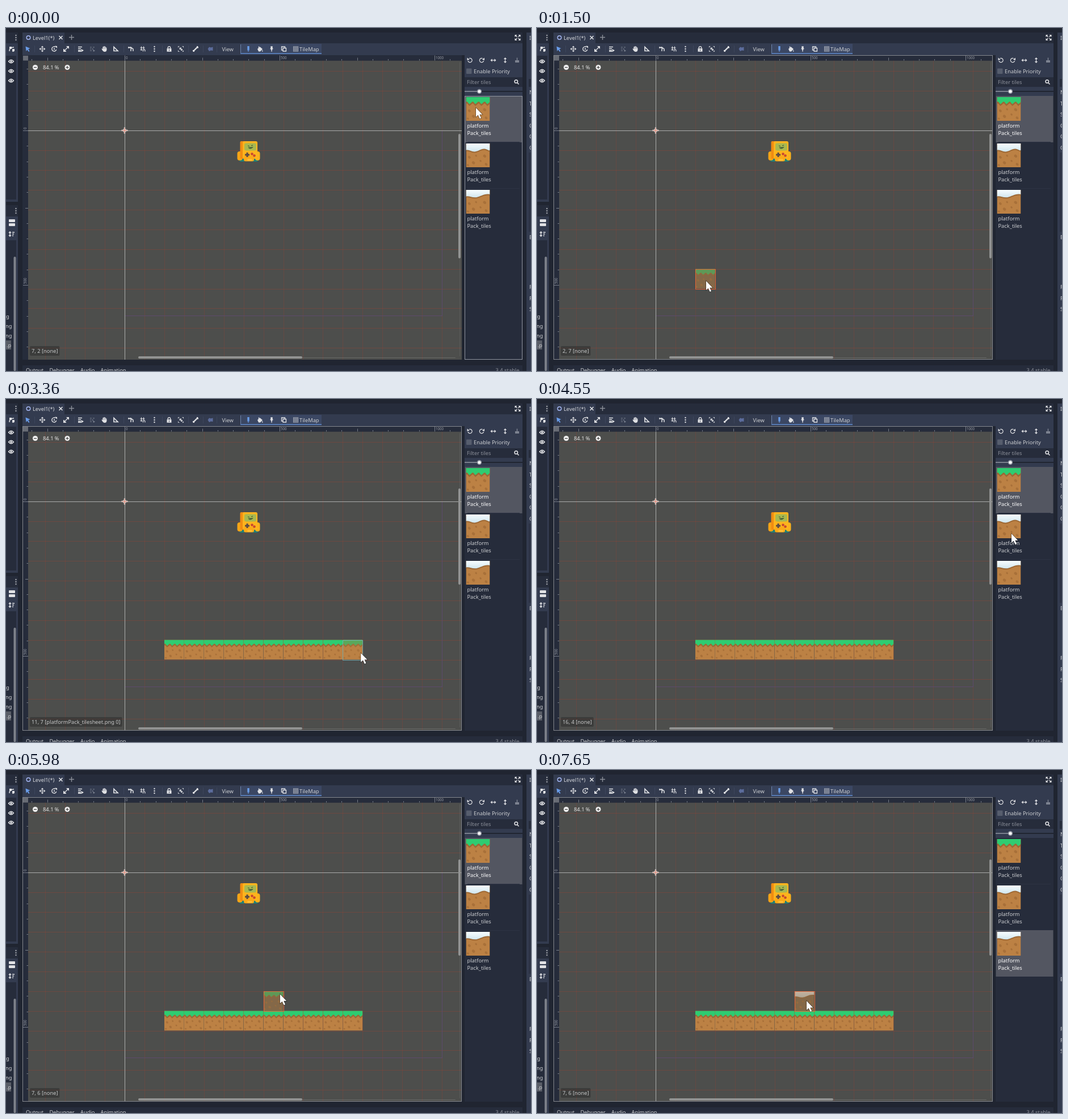
Recreate the animation shown at these times as an HTML page with a canvas. Size 925 px wide and 606 px high, loop 8 s.

```html
<!DOCTYPE html>
<html lang="en">
<head>
<meta charset="utf-8">
<title>Tile map editor</title>
<style>
html, body { margin: 0; width: 100%; height: 100%; overflow: hidden; background: #202531; }
canvas { display: block; }
</style>
</head>
<body>
<canvas id="stage" width="925" height="606"></canvas>
<script>
const g = document.getElementById('stage').getContext('2d');
const LOOP = 8000, ZOOM = 0.546, CELL = 64 * ZOOM, OX = 209, OY = 181;
const BASE = '#333b4f', DARK = '#262c3b', DARKER = '#202531', ICON = '#e0e1e4', BLUE = '#699ce8';
const PAINT = 1830, RELEASE = 3030, PICK_GRASS = 4970, PICK_SNOW = 6850;

// Cursor moves: start, end, steps, x, y, easing, optional control point
const smooth = u => u * u * (3 - 2 * u), easeIn = u => u * u, easeOut = u => u * (2 - u);
const MOVES = [
  [70, 840, 12, 297, 385, smooth],
  [900, 1500, 10, 298, 447, smooth],
  [PAINT, 2360, 9, 478, 449, easeIn],
  [2430, RELEASE, 10, 607, 452, easeOut],
  [3360, 3700, 6, 854, 258, smooth, 730, 437],
  [3960, 4160, 4, 836, 238, smooth],
  [4620, 4900, 5, 830, 150, smooth],
  [5240, 5780, 9, 476, 398, smooth],
  [5980, 6780, 12, 827, 313, smooth],
  [6980, 7650, 10, 475, 408, smooth]
];

function cursorAt(t) {
  let x = 828, y = 141;
  for (const [start, end, steps, ex, ey, ease, cx = (x + ex) / 2, cy = (y + ey) / 2] of MOVES) {
    if (t < start) break;
    const i = Math.floor((t - start) / (end - start) * (steps - 1) + 0.1);
    const u = ease(Math.min(i + 1, steps) / steps), v = 1 - u;
    x = v * v * x + 2 * u * v * cx + u * u * ex;
    y = v * v * y + 2 * u * v * cy + u * u * ey;
  }
  return { x, y };
}
const inView = p => p.x > 39 && p.x < 802 && p.y > 57 && p.y < 586;
const cellAt = p => [Math.floor((p.x - OX) / CELL), Math.floor((p.y - OY) / CELL)];

function lastInView(t) {
  for (let s = t; s >= 0; s -= 10) {
    const p = cursorAt(s);
    if (inView(p)) return { time: s, cell: cellAt(p) };
  }
  return { time: -2, cell: [7, 2] };
}

// Drawing helpers
function rect(x, y, w, h, c) { g.fillStyle = c; g.fillRect(x, y, w, h); }
function frame(x, y, w, h, c) { g.strokeStyle = c; g.lineWidth = 1; g.strokeRect(x + 0.5, y + 0.5, w - 1, h - 1); }
function pill(x, y, w, h, c, r = Math.min(w, h) / 2) {
  g.fillStyle = c; g.beginPath(); g.roundRect(x, y, w, h, r); g.fill();
}
function dot(x, y, r, c) { g.fillStyle = c; g.beginPath(); g.arc(x, y, r, 0, 7); g.fill(); }
function text(s, x, y, c = '#cdcfd2', size = 9.3) {
  g.font = size + 'px "Noto Sans", sans-serif'; g.fillStyle = c; g.fillText(s, x, y);
}
function icon(x, y, stroke, fill, c = ICON, w = 1.4) {
  g.save(); g.translate(x, y);
  g.strokeStyle = g.fillStyle = c; g.lineWidth = w;
  if (fill) g.fill(new Path2D(fill));
  if (stroke) g.stroke(new Path2D(stroke));
  g.restore();
}

// Tiles are described on a 64 unit square
const grassEdge = d => {
  let s = `M0 0V${13 + d}`;
  for (let x = 0; x < 64; x += 16) s += `L${x + 3} ${12 + d}L${x + 9} ${19 + d}L${x + 13} ${16 + d}L${x + 16} ${13 + d}`;
  return s + 'V0Z';
};
const snowEdges = [
  d => `M0 0V${18 + d}C10 ${16 + d} 14 ${23 + d} 24 ${22 + d}S42 ${12 + d} 52 ${15 + d}S60 ${20 + d} 64 ${18 + d}V0Z`,
  d => `M0 0V${18 + d}C8 ${15 + d} 16 ${22 + d} 28 ${20 + d}S48 ${9 + d} 64 ${12 + d}V0Z`
];
const SPOTS = [[9, 37, 4], [27, 33, 3], [50, 34, 4.5], [20, 52, 4.5], [39, 47, 3], [54, 56, 4], [5, 58, 3]];
function tile(kind, x, y, size, alpha = 1) {
  g.save();
  g.globalAlpha = alpha;
  g.translate(x, y); g.scale(size / 64, size / 64);
  g.beginPath(); g.rect(0, 0, 64, 64); g.clip();
  rect(0, 0, 64, 64, '#bc8144');
  for (const [sx, sy, r] of SPOTS) {
    g.fillStyle = '#a87039';
    g.beginPath(); g.ellipse(sx, sy, r, r * 0.8, 0.7, 0, 7); g.fill();
  }
  const edge = kind ? snowEdges[kind - 1] : grassEdge;
  g.fillStyle = '#9c6734'; g.fill(new Path2D(edge(kind ? 3 : 5)));
  let top = '#2ecc71';
  if (kind) {
    top = g.createLinearGradient(0, 0, 0, 22);
    top.addColorStop(0, '#f8fdff'); top.addColorStop(1, '#cfe5ed');
  }
  g.fillStyle = top; g.fill(new Path2D(edge(0)));
  g.restore();
}

function drawDocks() {
  rect(0, 0, 925, 606, DARKER);
  rect(0, 8, 21, 19, DARK);
  rect(0, 27, 21, 280, BASE);
  rect(0, 49, 18, 254, DARK);
  rect(0, 313, 21, 20, DARK);
  rect(0, 333, 21, 273, BASE);
  rect(0, 375, 18, 231, DARK);
  for (const y of [17, 323]) for (const d of [-4, 0, 4]) dot(17.5, y + d, 1.2, '#a5a8af');
  icon(10, 37, 'M-4 4C-4 -1 -1 -3 4 -3M-4 -3H0M1 1H4M1 4H4', 'M-4 -4H0V0H-4ZM1 0H5V4H1Z');
  for (const y of [59, 76, 93]) {
    icon(9, y, 'M-4.5 0Q0 -5.5 4.5 0Q0 5.5 -4.5 0Z');
    dot(9, y, 1.8, ICON);
  }
  pill(5, 338, 11, 5, ICON, 1); pill(5, 345, 11, 5, ICON, 1);
  icon(10, 364, 'M-3 -4V4M-5 -2L-3 -4L-1 -2M-5 2L-3 4L-1 2M1 -3H5M1 0H4M1 3H3');
  rect(0, 552, 9, 16, '#595d67');
  ['g', 'ng', 'ng', '.p'].forEach((s, i) => text(s, i ? -1 + (i === 3) * 2 : 0, 513 + i * 17));
  pill(13.5, 404, 4, 202, '#7e828b');

  rect(917, 8, 8, 19, BASE);
  rect(917, 27, 8, 579, BASE);
  rect(921, 90, 4, 14, DARK);
  rect(921, 220, 4, 140, '#2c3345');
  text('I', 922, 21);
  'NTSCCO'.split('').forEach((s, i) => text(s, 922, 117 + i * 19.5));
  [['E', 373], ['F', 461], ['F', 481], ['S', 500]].forEach(([s, y]) => text(s, 922, y));

  rect(29, 596, 881, 10, DARK);
  [['Output', 35], ['Debugger', 76.5], ['Audio', 131], ['Animation', 166.5]].forEach(([s, x]) => text(s, x, 607.5));
  text('3.4.stable', 862.5, 607.5, '#8b8f99');
}

function drawToolbar() {
  rect(29, 8, 881, 19, DARK);
  rect(29, 8, 74, 19, BASE);
  rect(29, 27, 881, 21, BASE);
  icon(39.5, 17, 'M3.3 0A3.3 3.3 0 1 1 -3.3 0A3.3 3.3 0 1 1 3.3 0', '', '#a5b7f3');
  text('Level1(*)', 47, 20.5, '#d8dade');
  icon(96.5, 17, 'M-3 -3L3 3M3 -3L-3 3', '', ICON, 1.6);
  icon(115.5, 16.5, 'M-4.5 0H4.5M0 -4.5V4.5', '', '#8b8f99');
  icon(901.5, 17, 'M-4 -4L-1 -1M4 -4L1 -1M-4 4L-1 1M4 4L1 1', 'M-5 -5H-1L-5 -1ZM5 -5H1L5 -1ZM-5 5H-1L-5 1ZM5 5H1L5 1Z', ICON, 1.2);

  for (const x of [50, 120, 207, 275, 321, 347, 371]) rect(x, 31, 1, 12, '#3d465b');
  rect(413, 28, 143, 18, '#3b4763');
  rect(413, 44.5, 143, 1.2, BLUE);
  rect(413, 29, 1, 15, '#6f86ae');
  const cross = 'M-4 0H4M0 -4V4';
  icon(38, 37, '', 'M-3.5 -4.5L4.5 -1L1.3 0.3L3.5 4L2 5L-0.5 1.5L-2.5 4Z', BLUE);
  icon(64, 37, cross, 'M0 -5.5L2.3 -2.8H-2.3ZM0 5.5L2.3 2.8H-2.3ZM-5.5 0L-2.8 -2.3V2.3ZM5.5 0L2.8 -2.3V2.3Z', ICON, 1);
  icon(85, 37, 'M3.7 1A4 4 0 1 1 2 -3.4', 'M1 -5.5L5 -5V-1ZM0 -1.2A1.2 1.2 0 1 1 0 1.2A1.2 1.2 0 1 1 0 -1.2');
  icon(106, 37, 'M-3 3L3 -3M-4 0V4H0', 'M0 -5H5V0ZM-5 0V5H0Z');
  icon(131, 37, 'M-4 -3.5H3M-4 -0.5H1M-4 2.5H1M-4 4.3H2', 'M1 0L6 2.5L2.5 5Z');
  icon(152, 37, 'M-4 -3H-1M1 -3H4M-4 0H-2M-1 0H2M-4 3H-1', 'M1 1L5 3L2 5Z', '#7c8290', 1.1);
  icon(173, 37, 'M-1.8 1V-4M0 1V-5M1.8 1V-4.3M3.6 2V-2.5M-2 3L-4 -0.5', 'M-3 0H4.3V2C4.3 6 -1 6 -3 2.5Z', ICON, 1.5);
  icon(193, 37, 'M-3 -3.5V3.5H4Z', '', ICON, 1.7);
  icon(220, 37, 'M-4 -4V-1M-1 -4V-1M-4 -2.5H2M0 4V1A2 2 0 0 1 4 1V4', '', ICON, 1.5);
  icon(240.5, 37, 'M-4 -2H4M-2 -4.5V3M2 -4.5V0M-4 1.5H0M1 4.5V2.5A1.7 1.7 0 0 1 4.4 2.5V4.5', '', ICON, 1.2);
  for (const d of [-4, 0, 4]) dot(261.5, 37 + d, 1.2, ICON);
  icon(287.5, 37, 'M-2.2 -0.5V-2.2A2.2 2.2 0 0 1 2.2 -2.2V-0.5', 'M-4 -0.8H4V4.8H-4Z');
  rect(287, 38, 1, 2.3, BASE);
  icon(308, 37, 'M-4.5 -2.5V-4.5H-2.5M2.5 -4.5H4.5V-2.5M4.5 2.5V4.5H2.5M-2.5 4.5H-4.5V2.5', 'M-2.5 -2.5H1V1H-2.5ZM0 0H3V3H0Z', '#bfc2c8', 1.1);
  icon(334, 37, 'M-3 3L3 -3', 'M-5 2H-2V5H-4L-5 4ZM2 -5H4L5 -3V-1.5H2Z', ICON, 2.4);
  icon(360, 37, '', 'M-4.5 0L-2 -3.5L1 -2.5L4.5 -3.5V3L1 2.5L-2 4Z', '#5c6c9c');
  text('View', 380.5, 40.5);
  icon(427, 37, '', 'M-1.7 -5H1.7V2H-1.7ZM-1.7 2.5H1.7L0 5Z', BLUE);
  icon(447.5, 37, 'M-2 -4.5V-1', 'M-4.5 0L0 -3.8L4.5 0.2L0.5 4.5H-2.5ZM4 1.5Q6 4 4.3 5Q3 4 4 1.5');
  icon(468, 37, 'M0 1V5', 'M-1.7 -4.7H1.7V-1H2.5V0.2H1.6L0 3.5L-1.6 0.2H-2.5V-1H-1.7Z', ICON, 1.1);
  icon(489.5, 37, 'M-1.5 -1.5H4V4H-1.5ZM-1.5 2H-4V-4H2V-1.5', '', ICON, 1.3);
  icon(510.5, 37, 'M-4.5 -4H4.5M-4.5 -1.4H4.5M-4.5 1.4H4.5M-4.5 4H4.5M-4 -4.5V4.5M-1.4 -4.5V4.5M1.4 -4.5V4.5M4 -4.5V4.5', '', '#b9bcc3', 0.8);
  text('TileMap', 517, 40.5);
}

function drawRulers() {
  rect(29, 48, 774, 9.5, DARK);
  rect(29, 48, 10, 538, DARK);
  rect(30, 49, 9, 8.5, '#686c75');
  const tone = '#777c88';
  for (let u = -350; u <= 1100; u += 50) {
    const len = u % 500 === 0 ? 9 : u % 250 === 0 ? 5 : 2.5;
    const x = Math.round(OX + u * ZOOM), y = Math.round(OY + u * ZOOM);
    if (x > 39 && x < 803) rect(x, 57.5 - len, 1, len, tone);
    if (y > 58 && y < 586) rect(39 - len, y, len, 1, tone);
    if (u % 500 === 0 && u >= 0) {
      text(String(u), x + 2, 54.5, '#9a9ea8', 6.2);
      if (u < 1000) {
        g.save(); g.translate(36, y - 1); g.rotate(-Math.PI / 2);
        text(String(u), 1, 0, '#9a9ea8', 6.2);
        g.restore();
      }
    }
  }
}

function drawRobot() {
  pill(411, 231, 10, 5, '#1f7f78', 2); pill(434, 231, 10, 5, '#1f7f78', 2);
  pill(407.5, 218, 9, 16, '#f7a416', 4);
  pill(439, 218, 8.5, 16, '#fbb01b', 4);
  pill(412.5, 200, 10, 31, '#f08c12', 2);
  pill(417, 200, 26, 31, '#fdb41d', 3);
  pill(419, 226, 18, 9.5, '#fbaa18', 3);
  pill(420, 203.5, 21, 13, '#a9b84e', 3);
  icon(430, 210, 'M-4 -2L-1 -1M2 -2L5 -3M-3 1Q1 5 5 0', 'M-2 0.5H5Q2 5 -2 0.5', '#3d5a39', 1.2);
  rect(421, 222.5, 8, 3, '#5c4a44'); rect(423.5, 220, 3, 8, '#5c4a44');
  dot(433.5, 222.5, 2.3, '#c9472f'); dot(437.5, 225.5, 2.3, '#c9472f');
  pill(425, 231.5, 9, 3, '#fdc13a');
}

function drawView(t, pos, hover) {
  g.save();
  g.beginPath(); g.rect(39, 57.5, 764, 528.5); g.clip();
  rect(39, 57, 764, 529, '#4d4e4c');
  for (let k = -4; k < 18; k++) rect(Math.round(OX + k * CELL), 57, 1, 529, 'rgba(165,65,45,.27)');
  for (let k = -3; k < 12; k++) rect(39, Math.round(OY + k * CELL), 764, 1, 'rgba(165,65,45,.36)');
  rect(768, OY, 1, 328, '#5d4a6b'); rect(OX, 508, 560, 1, '#5d4a6b');
  drawRobot();

  const painted = t < PAINT ? 1 : t < RELEASE ? Math.min(11, cellAt(pos)[0]) : 11;
  const filled = (cx, cy) => cy === 7 && cx >= 2 && cx <= painted;
  for (let k = 2; k <= painted; k++) tile(0, OX + k * CELL, OY + 7 * CELL, CELL);
  rect(OX, 57, 1, 529, '#abacab');
  rect(39, OY, 764, 1, '#abacab');
  icon(209, 181, 'M-5.5 0H5.5M0 -5.5V5.5', 'M-2.5 -2.5H2.5V2.5H-2.5Z', '#d9d9d9', 2.4);
  icon(209, 181, 'M-4.5 0H4.5M0 -4.5V4.5', '', '#e8806a', 1.1);

  const [cx, cy] = hover.cell;
  if (inView(pos)) {
    const x = OX + cx * CELL, y = OY + cy * CELL;
    tile(t < PICK_SNOW ? 0 : 2, x, y, CELL, 0.5);
    g.strokeStyle = filled(cx, cy) ? 'rgba(110,195,205,.7)' : 'rgba(255,102,51,.8)';
    g.lineWidth = 1;
    g.strokeRect(Math.round(x) + 0.5, Math.round(y) + 0.5, 35, 35);
  }

  dot(51.5, 69.5, 4.5, '#f0f0f0'); rect(49, 69, 5, 1.2, '#444');
  dot(108, 69.5, 4.5, '#f0f0f0'); rect(105.5, 69, 5, 1.2, '#444'); rect(107.4, 67, 1.2, 5, '#444');
  text('84.1 %', 65, 73, '#e4e4e4');

  const label = `${cx}, ${cy} [${filled(cx, cy) ? 'platformPack_tilesheet.png 0' : 'none'}]`;
  g.font = '9.3px "Noto Sans", sans-serif';
  pill(42, 562, g.measureText(label).width + 6, 17, 'rgba(38,38,38,.45)', 2);
  text(label, 45, 574, '#c6c7c8');

  pill(799, 60, 1, 520, 'rgba(255,255,255,.07)');
  pill(233, 582, 559, 1, 'rgba(255,255,255,.14)');
  if (t < PAINT) pill(797, 187, 4, 220, '#929392');
  else pill(797, 158, 4, 170, '#929392');
  pill(233, 580, 289, 4, '#929392');
  g.restore();
}

function drawPalette(t, focused) {
  rect(803, 48, 5, 538, DARKER);
  rect(808, 48, 102, 538, BASE);
  const turn = 'M-3.6 1A3.7 3.7 0 1 0 -1.5 -3.4', head = 'M-5 -4.5V0L-0.8 -1.2Z';
  icon(817.5, 57, turn, head, ICON, 1.2);
  g.save(); g.translate(838, 57); g.scale(-1, 1); icon(0, 0, turn, head, ICON, 1.2); g.restore();
  icon(858.5, 57, 'M-3 0H3', 'M-5 0L-2 -2.7V2.7ZM5 0L2 -2.7V2.7Z', ICON, 1.2);
  icon(879.5, 57, 'M0 -3V3', 'M0 -5L-2.7 -2H2.7ZM0 5L-2.7 2H2.7Z', ICON, 1.2);
  icon(900.5, 57, 'M0 -4.5V0', 'M-3.5 0H3.5V4H-3.5Z', '#7c8290', 1.5);
  pill(811, 71.5, 9.5, 9.5, '#565d6d', 1);
  text('Enable Priority', 824, 79.5);
  rect(808, 87, 102, 17, DARK);
  text('Filter tiles', 812, 99, '#8d919b');
  icon(899.5, 95.5, 'M2 -1A2.7 2.7 0 1 1 -3.4 -1A2.7 2.7 0 1 1 2 -1M1.2 1L4 4', '', ICON, 1.6);
  rect(808, 111, 102, 2, DARKER); rect(808, 111, 26, 2, '#7a808d');
  dot(834, 112, 4.2, '#8c919c'); dot(834, 112, 2.6, '#fff');

  rect(808, 120, 102, 466, DARK);
  const chosen = t < PICK_SNOW ? 0 : 2;
  for (let i = 0; i < 3; i++) {
    const y = 120 + i * 82, on = i === chosen;
    if (on) rect(808.5, y + (i ? -1 : 0), 101, 82, '#535661');
    else if (i) rect(813, y - 1, 92, 1, '#2d3343');
    tile(i, 810.5, y + 2, 42);
    text('platform', 812.5, y + 55.5, on ? '#fff' : '#cdcfd2');
    text('Pack_tiles', 812.5, y + 69, on ? '#fff' : '#cdcfd2');
  }
  if (focused) frame(808, 120, 102, 466, '#9095a0');
  else frame(29, 48, 774, 538, '#84878d');
}

function drawCursor(t, p) {
  const held = (a, b) => t >= a && t < b;
  if (held(PAINT, RELEASE) || held(PICK_GRASS, 5040) || held(PICK_SNOW, 6980)) dot(p.x - 1, p.y, 12, 'rgba(222,192,28,.88)');
  const arrow = 'M0 0V16L3.7 12.7L6.6 19L9.2 17.9L6.4 11.7H11.3Z';
  icon(p.x, p.y, arrow, '', 'rgba(0,0,0,.55)', 1.2);
  icon(p.x, p.y, '', arrow, '#fff');
}

function draw(t) {
  const pos = cursorAt(t), hover = lastInView(t);
  const focused = [-1, PICK_GRASS, PICK_SNOW].some(c => c <= t && c > hover.time);
  drawDocks();
  drawToolbar();
  drawView(t, pos, hover);
  drawRulers();
  drawPalette(t, focused);
  drawCursor(t, pos);
}

const begin = performance.now();
function tick() {
  draw((performance.now() - begin) % LOOP);
  requestAnimationFrame(tick);
}
tick();
</script>
</body>
</html>
```
